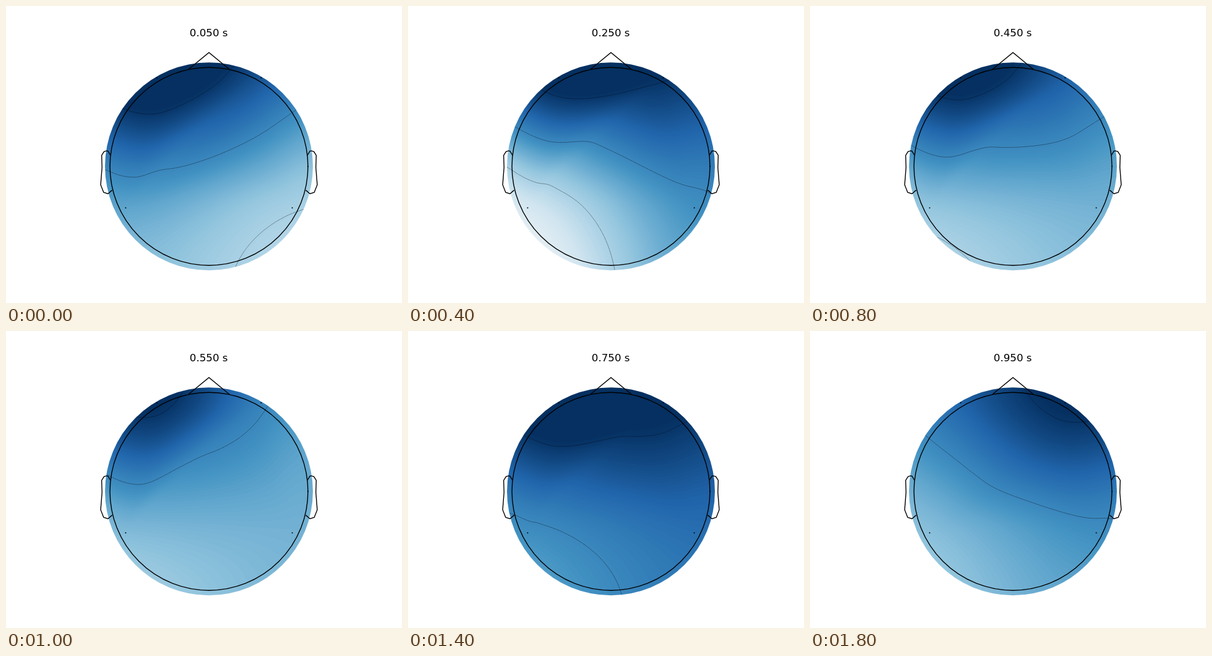
An HTML page with a canvas that plays this animation: 640x480 px, repeating every 2 s.

```html
<!DOCTYPE html>
<html lang="en">
<head>
<meta charset="utf-8">
<title>Scalp map</title>
<style>
  html, body { margin: 0; width: 100%; height: 100%; overflow: hidden; background: #fff; }
  canvas { display: block; }
</style>
</head>
<body>
<canvas id="stage" width="640" height="480"></canvas>
<script>
const ctx = document.getElementById('stage').getContext('2d');
const CX = 328, CY = 259.2, HEAD = 160, MASK = 168, RING = 428;
const STEP_MS = 200;
const RES = 64, SIZE = 2 * MASK, CELL = SIZE / (RES - 1);
const LEFT = CX - MASK, TOP = CY - MASK;
const LEVEL_SHARE = 0.325; // one contour level as a share of the colour range

// Readings of the front left, front right, back left and back right sensors, in contour levels.
const readings = [
  [-3.39, -2.65, -1.63, -1.03],
  [-3.16, -3.10, -0.01, -2.29],
  null,
  [-3.37, -2.97, -1.07, -1.46],
  null,
  [-3.10, -2.07, -1.35, -1.46],
  null,
  [-3.43, -3.19, -1.90, -2.33],
  [-3.25, 0.02, 0, -1.65],
  [-2.46, -3.13, -1.30, -1.90]
];
// Gaps are filled halfway between their neighbours.
const samples = readings.map((r, i) => r || readings[i - 1].map((v, k) => (v + readings[i + 1][k]) / 2));

const pair = (dx, dy) => [[CX - dx, CY + dy], [CX + dx, CY + dy]];
const sensors = [...pair(84.4, -143.2), ...pair(134.6, 67.1)];

// Helper nodes around the head; each takes the mean of the sensors on its side.
const ring = [], owners = [];
for (let k = 0; k < 12; k++) {
  const c = Math.cos(k * Math.PI / 6), s = Math.sin(k * Math.PI / 6), eps = 1e-9;
  ring.push([CX + RING * c, CY - RING * s]);
  owners.push([0, 1, 2, 3].filter(i =>
    (i < 2 ? s > 0.5 - eps : s < 0.5 + eps) && (i % 2 ? c > -eps : c < eps)));
}
const nodes = sensors.concat(ring);

const triangles = [[0, 1, 2], [1, 3, 2]];
owners.forEach((own, k) => {
  const next = (k + 1) % owners.length;
  const shared = own.find(s => owners[next].includes(s));
  triangles.push([shared, 4 + k, 4 + next]);
  if (own.length === 2) triangles.push([own[0], own[1], 4 + k]);
});

const links = nodes.map((_, i) => {
  const set = new Set(triangles.filter(t => t.includes(i)).flat());
  set.delete(i);
  return [...set];
});

function barycentric(tri, x, y) {
  const [a, b, c] = tri.map(i => nodes[i]);
  const det = (b[1] - c[1]) * (a[0] - c[0]) + (c[0] - b[0]) * (a[1] - c[1]);
  const u = ((b[1] - c[1]) * (x - c[0]) + (c[0] - b[0]) * (y - c[1])) / det;
  const v = ((c[1] - a[1]) * (x - c[0]) + (a[0] - c[0]) * (y - c[1])) / det;
  return [u, v, 1 - u - v];
}

// Gradients that minimise the bending of the curves along all edges.
function estimateGradients(values) {
  const grad = nodes.map(() => [0, 0]);
  for (let pass = 0; pass < 100; pass++) {
    nodes.forEach((p, i) => {
      let xx = 0, xy = 0, yy = 0, sx = 0, sy = 0;
      for (const j of links[i]) {
        const ex = nodes[j][0] - p[0], ey = nodes[j][1] - p[1];
        const w = 1 / Math.hypot(ex, ey) ** 3;
        const rhs = 6 * (values[j] - values[i]) - 2 * (grad[j][0] * ex + grad[j][1] * ey);
        xx += 4 * ex * ex * w; xy += 4 * ex * ey * w; yy += 4 * ey * ey * w;
        sx += rhs * ex * w; sy += rhs * ey * w;
      }
      const det = xx * yy - xy * xy;
      grad[i] = [(yy * sx - xy * sy) / det, (xx * sy - xy * sx) / det];
    });
  }
  return grad;
}

// Clough-Tocher control values of one triangle.
function makePatch(tri, values, grad) {
  const f = tri.map(i => values[i]);
  const a = tri.map((n, i) => tri.map(m =>
    f[i] + (grad[n][0] * (nodes[m][0] - nodes[n][0]) + grad[n][1] * (nodes[m][1] - nodes[n][1])) / 3));
  const q = f.map((v, i) => (a[i][(i + 1) % 3] + a[i][(i + 2) % 3] + v) / 3);
  const m = f.map((_, k) => {
    const i = (k + 1) % 3, j = (k + 2) % 3;
    const other = triangles.find(t => t !== tri && t.includes(tri[i]) && t.includes(tri[j]));
    let g = -0.5;
    if (other) {
      const mid = [0, 1].map(d => other.reduce((s, n) => s + nodes[n][d], 0) / 3);
      const c = barycentric(tri, mid[0], mid[1]);
      g = (2 * c[j] + c[i] - 1) / (2 - 3 * c[j] - 3 * c[i]);
    }
    return (g * (-f[i] + 3 * a[i][j] - 3 * a[j][i] + f[j]) - f[i] + 2 * a[i][j] - a[j][i] + q[i] + q[j]) / 2;
  });
  const r = q.map((v, i) => (m[(i + 1) % 3] + m[(i + 2) % 3] + v) / 3);
  return { f, a, q, m, r, centre: (r[0] + r[1] + r[2]) / 3 };
}

function evalPatch({ f, a, q, m, r, centre }, bary) {
  const low = Math.min(...bary), h = 3 * low, b = bary.map(v => v - low);
  let w = h ** 3 * centre;
  for (let i = 0; i < 3; i++) {
    const j = (i + 1) % 3, k = (i + 2) % 3;
    w += b[i] ** 3 * f[i] + 3 * b[i] ** 2 * (b[j] * a[i][j] + b[k] * a[i][k] + h * q[i])
       + 3 * b[i] * h * h * r[i] + 6 * b[j] * b[k] * h * m[i];
  }
  return w;
}

function locate(x, y) {
  for (let t = 0; t < triangles.length; t++) {
    const bary = barycentric(triangles[t], x, y);
    if (Math.min(...bary) > -1e-9) return { t, bary };
  }
}

const grid = Array.from({ length: RES * RES }, (_, n) =>
  locate(LEFT + n % RES * CELL, TOP + Math.floor(n / RES) * CELL));

function makeField(sample) {
  const values = sample.concat(owners.map(own => own.reduce((s, i) => s + sample[i], 0) / own.length));
  const grad = estimateGradients(values);
  const patches = triangles.map(t => makePatch(t, values, grad));
  return grid.map(({ t, bary }) => evalPatch(patches[t], bary));
}

// Cold part of a diverging scale, up to just past its neutral middle.
const stops = ['053061', '2166ac', '4393c3', '92c5de', 'd1e5f0', 'f7f7f7', 'fddbc7']
  .map(h => [0, 2, 4].map(i => parseInt(h.slice(i, i + 2), 16)));

function colour(value) {
  const shade = Math.floor((value * LEVEL_SHARE + 1) * 128) / 25.5;
  const t = Math.max(0, Math.min(stops.length - 1.001, shade)), k = Math.floor(t);
  return stops[k].map((c, d) => c + (stops[k + 1][d] - c) * (t - k));
}

function paintField(field) {
  const layer = document.createElement('canvas');
  layer.width = layer.height = SIZE + 2;
  const g = layer.getContext('2d');
  const img = g.createImageData(SIZE + 2, SIZE + 2);
  const x0 = Math.floor(LEFT), y0 = Math.floor(TOP);
  const toGrid = v => Math.max(0, Math.min(RES - 1.001, v / CELL));
  for (let y = 0, o = 0; y < SIZE + 2; y++) {
    const gy = toGrid(y0 + y + 0.5 - TOP), iy = Math.floor(gy), fy = gy - iy;
    for (let x = 0; x < SIZE + 2; x++, o += 4) {
      const gx = toGrid(x0 + x + 0.5 - LEFT), ix = Math.floor(gx), fx = gx - ix;
      const n = iy * RES + ix;
      const v = (field[n] * (1 - fx) + field[n + 1] * fx) * (1 - fy)
              + (field[n + RES] * (1 - fx) + field[n + RES + 1] * fx) * fy;
      img.data.set([...colour(v), 255], o);
    }
  }
  g.putImageData(img, 0, 0);
  ctx.drawImage(layer, x0, y0);
}

// Marching squares, with segments joined into lines so that dashes run on.
function traceContours(field, level) {
  const points = new Map(), joins = new Map();
  const cross = (a, b) => {
    const va = field[a] - level, vb = field[b] - level;
    if ((va < 0) === (vb < 0)) return null;
    const key = a * RES * RES + b, t = va / (va - vb);
    const at = (n, m) => n + (m - n) * t;
    points.set(key, [LEFT + CELL * at(a % RES, b % RES),
                     TOP + CELL * at(Math.floor(a / RES), Math.floor(b / RES))]);
    return key;
  };
  const join = (a, b) => joins.set(a, (joins.get(a) || []).concat(b));
  for (let y = 0; y < RES - 1; y++) {
    for (let x = 0; x < RES - 1; x++) {
      const n = y * RES + x;
      const hits = [cross(n, n + 1), cross(n, n + RES), cross(n + 1, n + RES + 1), cross(n + RES, n + RES + 1)]
        .filter(k => k !== null);
      for (let i = 0; i + 1 < hits.length; i += 2) {
        join(hits[i], hits[i + 1]);
        join(hits[i + 1], hits[i]);
      }
    }
  }
  const keys = [...joins.keys()].sort((a, b) => joins.get(a).length - joins.get(b).length);
  const seen = new Set(), lines = [];
  for (const start of keys) {
    const line = [];
    for (let key = start; key !== undefined && !seen.has(key); key = joins.get(key).find(k => !seen.has(k))) {
      seen.add(key);
      line.push(points.get(key));
    }
    if (line.length > 1) lines.push(line);
  }
  return lines;
}

function strokeLine(points) {
  ctx.beginPath();
  points.forEach(p => ctx.lineTo(p[0], p[1]));
  ctx.stroke();
}

function disc(x, y, r) {
  ctx.beginPath();
  ctx.arc(x, y, r, 0, 2 * Math.PI);
}

// Corners of the right ear, from the head's centre.
const ear = [[159, -17.8], [163.2, -24.8], [165.8, -25], [169.6, -23.9], [173.4, -17.8],
             [172.8, 1.8], [175, 29.8], [170.2, 42], [163.2, 44.3], [156.5, 38.4]];

function drawHead() {
  ctx.strokeStyle = ctx.fillStyle = '#000';
  ctx.lineWidth = 1.4;
  ctx.setLineDash([]);
  disc(CX, CY, HEAD);
  ctx.stroke();
  strokeLine([[CX - 33.5, CY - 156.5], [CX, CY - 184], [CX + 33.5, CY - 156.5]]);
  for (const side of [-1, 1]) strokeLine(ear.map(([x, y]) => [CX + side * x, CY + y]));
  for (const [x, y] of [...sensors, [CX + HEAD, CY]]) {
    disc(x, y, 1);
    ctx.fill();
  }
}

function draw(step) {
  const field = makeField(samples[step]);
  ctx.fillStyle = '#fff';
  ctx.fillRect(0, 0, 640, 480);

  ctx.save();
  disc(CX, CY, MASK);
  ctx.clip();
  paintField(field);
  ctx.strokeStyle = '#000';
  ctx.lineWidth = 0.5;
  for (let level = -3; level <= 0; level++) {
    ctx.setLineDash(level < 0 ? [1.85, 0.8] : []);
    traceContours(field, level).forEach(strokeLine);
  }
  ctx.restore();

  drawHead();
  ctx.font = '16.67px "DejaVu Sans", sans-serif';
  ctx.textAlign = 'center';
  ctx.fillText((0.05 + step * 0.1).toFixed(3) + ' s', 327.7, 49);
}

let shown = -1;
function tick() {
  const step = Math.floor(performance.now() / STEP_MS) % samples.length;
  if (step !== shown) draw(shown = step);
  requestAnimationFrame(tick);
}
tick();
</script>
</body>
</html>
```
